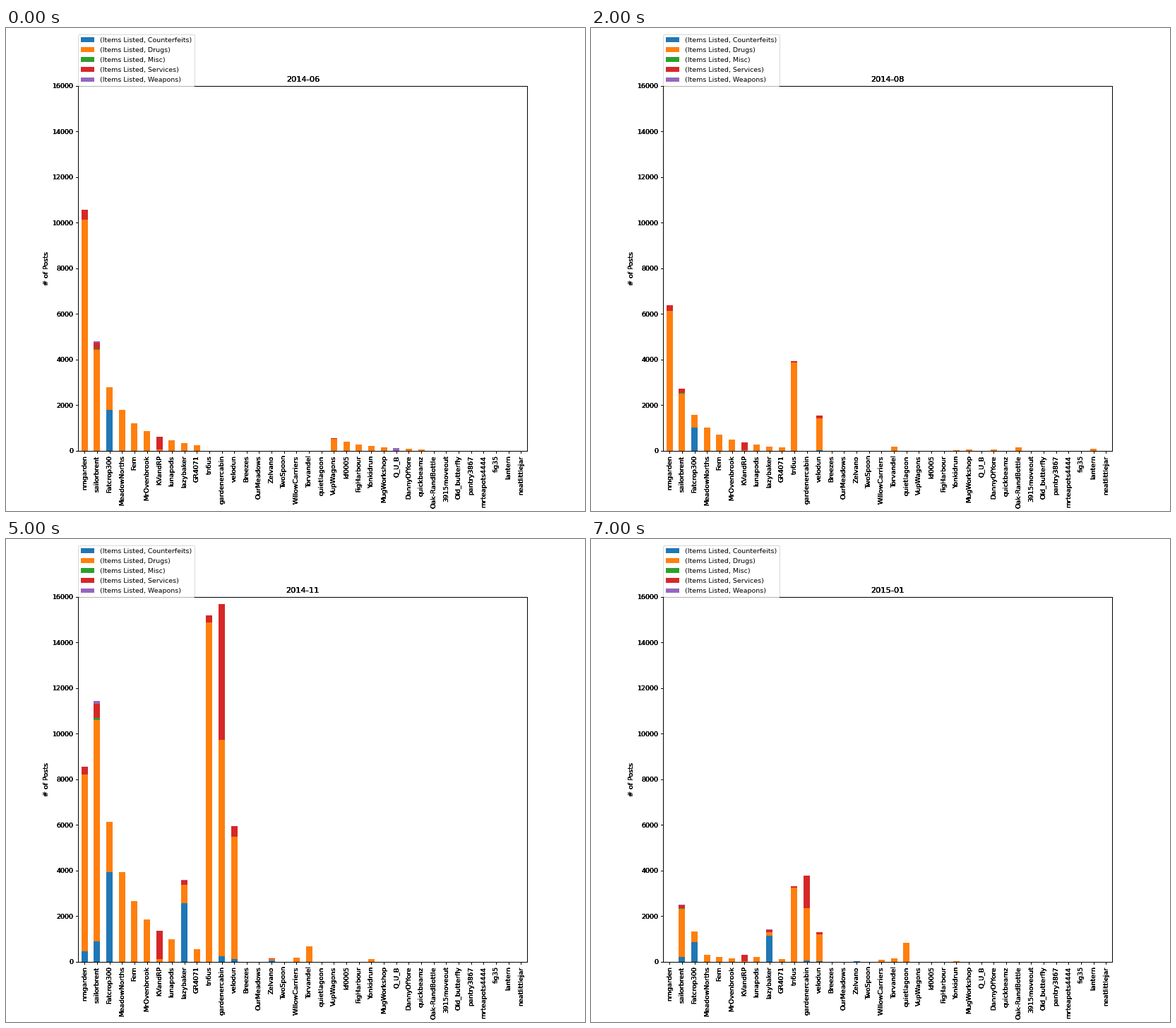
A matplotlib script that plays this animation: 820 by 683 pixels, repeating every 8 s.

```python
import numpy as np
import matplotlib.pyplot as plt
from matplotlib.animation import FuncAnimation

W, H, DPI = 820, 683, 68.33
BOX = [0.1248, 0.125, 0.7756, 0.755]
LAYERS = 4  # lettering is laid down repeatedly, which hardens its edges
LINE = 1.05

GROUPS = ["Counterfeits", "Drugs", "Misc", "Services", "Weapons"]
COLORS = ["#1f77b4", "#ff7f0e", "#2ca02c", "#d62728", "#9467bd"]
MONTHS = [f"2014-{m:02d}" for m in range(6, 13)] + ["2015-01"]
VENDORS = """nmgarden sailorbrent Fatcrop300 MeadowNorths Fern MrOvenbrook
KVandRP lunapods lazybaker GR4071 tn6us gardenercabin velodun Breezes
OurMeadows Zelvano TwoSpoon WillowCarriers Torvandel quietlagoon VupWagons
kf0005 FigHarbour Yonkidrun MugWorkshop Q_U_B DannyOfYore quickbeamz
Oak-RandBottle 3915moveout Old_butterfly pantry3867 mrteapots4444 fig35
lantern neatlittlejar""".split()
N = len(VENDORS)

# Shares of the groups within a vendor's listings
FAKES = (1, 0, 0, 0, 0)
DRUGS = (0, 1, 0, 0, 0)
ARMS = (0, 0, 0, 0, 1)

t = np.arange(len(MONTHS))
market = np.interp(t, [0, 2, 4, 5, 6, 7], [1, 0.57, 0.87, 2.2, 2, 0.48])
table = np.zeros((len(MONTHS), len(GROUPS), N))


def add(i, amounts, mix=DRUGS):
    table[:, :, i] += np.outer(amounts, mix)


def sell(i, size, mix=DRUGS, first=-1, last=7):
    """Follow the market from `first`, at half strength in that month."""
    ramp = np.clip((t - first + 1) / 2, 0, 1) * (t <= last)
    add(i, size * ramp * market, mix)


# The leader leaves before December; one newcomer peaks then.
add(0, np.interp(t, [0, 2, 5, 6], [10560, 6380, 8100, 0]),
    (0, 0.96, 0, 0.04, 0))
add(11, np.interp(t, [4, 5, 6, 7], [0, 15690, 27000, 3770]),
    (0.015, 0.605, 0, 0.38, 0))

# Veterans fall off with rank; the middle ranks thin out late.
mixes = {1: (0, 0.92, 0.01, 0.06, 0.01), 2: (0.64, 0.36, 0, 0, 0),
         6: (0, 0.08, 0, 0.92, 0)}
for i in range(1, 10):
    sell(i, 10560 * (i + 1) ** -0.85 * np.exp(-0.2 * i), mixes.get(i, DRUGS))
table[6:, :, 3:6] *= 0.35

# Later arrivals and side lines
sell(0, 200, FAKES, 4, 5)
sell(1, 400, FAKES, 4)
sell(8, 2600, (0.9, 0.02, 0, 0.07, 0.01), 5)
sell(10, 6900, (0, 0.98, 0, 0.02, 0), 1)
sell(12, 2700, (0.02, 0.9, 0, 0.08, 0), 1)
sell(15, 60, (0.3, 0.5, 0, 0.2, 0), 4)
sell(17, 150, first=5)
sell(18, 310, first=1)
sell(19, 1700, first=6)
sell(23, 55, first=1)
sell(33, 150, first=6, last=6)
for i, size in [(24, 90), (26, 70), (28, 260), (34, 130)]:
    sell(i, size, first=1, last=4)

# Small vendors that vanish after the opening months
for j in range(8):
    mix = {0: (0, 0.9, 0, 0.1, 0), 5: ARMS}.get(j, DRUGS)
    add(20 + j, 560 * np.exp(-0.35 * j) * np.interp(t, [0, 2], [1, 0]), mix)

fig = plt.figure(figsize=((W + 1e-3) / DPI, (H + 1e-3) / DPI), dpi=DPI,
                 facecolor="white")


def add_axes(frame):
    ax = fig.add_axes(BOX, frameon=frame)
    ax.set(xlim=(-0.5, N - 0.5), ylim=(0, 16000), ylabel="# of Posts")
    ax.set_xticks(range(N), VENDORS, rotation=90)
    ax.set_yticks(range(0, 16001, 2000))
    ax.tick_params(width=LINE)
    ax.spines[:].set_linewidth(LINE)
    return ax


layers = [add_axes(k == 0) for k in range(LAYERS)]
chart = layers[0]
bars = [chart.bar(range(N), np.zeros(N), 0.5, color=c,
                  label=f"(Items Listed, {g})")
        for g, c in zip(GROUPS, COLORS)]
chart.legend(loc="lower left", bbox_to_anchor=(0, 1), borderaxespad=0,
             labelspacing=0.53)


def update(k):
    base = np.zeros(N)
    for group, row in zip(bars, table[k]):
        for rect, y, h in zip(group, base, row):
            rect.set(y=y, height=h)
        base += row
    for ax in layers:
        ax.set_title(MONTHS[k])


anim = FuncAnimation(fig, update, frames=len(MONTHS), init_func=lambda: None,
                     interval=1000, repeat=True, repeat_delay=0)
plt.show()
```
